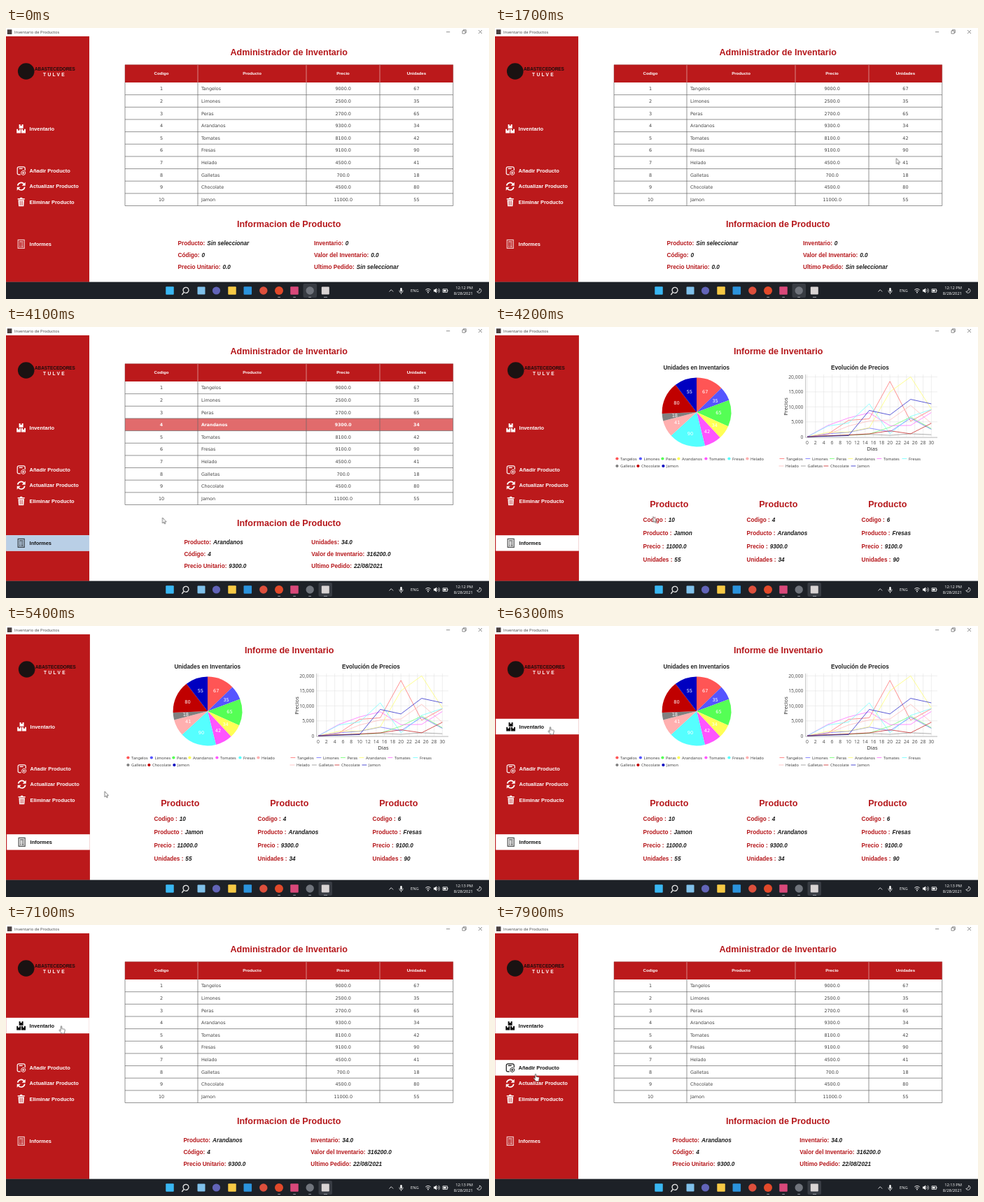
These frames come from a looping animation (690 by 388 pixels, 8 s). An HTML page:

```html
<!DOCTYPE html>
<html lang="es">
<head>
<meta charset="utf-8">
<title>Inventario de Productos</title>
<style>
  html, body { margin: 0; width: 100%; height: 100%; overflow: hidden; background: #fff; }
  svg { display: block; width: 100vw; height: 100vh; }
  text { font-family: "Liberation Sans", Arial, sans-serif; fill: #222; white-space: pre; }
  .mid { text-anchor: middle; }
  .end { text-anchor: end; }
  .title { font-size: 12.55px; font-weight: bold; fill: #b5171b; }
  .field { font-size: 8.2px; font-weight: bold; fill: #b5171b; }
  .field tspan { font-style: italic; fill: #1c1c1c; }
  .chart { font-size: 8.2px; font-weight: bold; }
  .head { font-size: 6.1px; font-weight: bold; fill: #fff; }
  .cell { font: 6.45px "DejaVu Sans", sans-serif; fill: #444; }
  .picked { font: bold 6.2px "DejaVu Sans", sans-serif; fill: #fff; }
  .slice { font: 6.6px "DejaVu Sans", sans-serif; fill: #fff; }
  .legend { font: 5.7px "Noto Sans", sans-serif; fill: #444; }
  .tick { font: 6.8px "Noto Sans", sans-serif; fill: #555; }
  .axis { font: 7.6px "Noto Sans", sans-serif; fill: #333; }
  .sys { font: 5.75px "Open Sans", sans-serif; fill: #fff; }
  .menu text { font-size: 7.45px; font-weight: bold; fill: currentColor; }
</style>
</head>
<body>
<svg id="stage" viewBox="0 0 690 388" preserveAspectRatio="none"></svg>
<script>
const LOOP = 8000;
const RED = '#bb191b';

const text = (x, y, str, cls, extra = '') => `<text x="${x}" y="${y}" class="${cls}" ${extra}>${str}</text>`;
const rect = (x, y, w, h, fill, extra = '') => `<rect x="${x}" y="${y}" width="${w}" height="${h}" fill="${fill}" ${extra}/>`;
const circle = (x, y, r, fill) => `<circle cx="${x}" cy="${y}" r="${r}" fill="${fill}"/>`;
const line = (d, stroke, width = 0.7) => `<path d="${d}" fill="none" stroke="${stroke}" stroke-width="${width}"/>`;
const group = (id, ...parts) => `<g id="${id}">${parts.flat(9).join('')}</g>`;
const field = (x, y, label, value) => text(x, y, `${label}<tspan dx="3">${value}</tspan>`, 'field');

// name, units, price, pie/line colour, price history every five days
const products = [
  ['Tangelos', 67, '9000.0', '#ff5555', [0, 900, 5500, 6000, 18500, 5200, 9000]],
  ['Limones', 35, '2500.0', '#5555ff', [0, 1000, 1500, 2900, 1700, 6200, 2500]],
  ['Peras', 65, '2700.0', '#55ff55', [0, 300, 500, 900, 3200, 6600, 2700]],
  ['Arandanos', 34, '9300.0', '#ffff55', [0, 1500, 1600, 3000, 15000, 20000, 9300]],
  ['Tomates', 42, '8100.0', '#ff55ff', [0, 3800, 6300, 8000, 3700, 3800, 8100]],
  ['Fresas', 90, '9100.0', '#55ffff', [0, 3600, 4600, 11000, 1000, 6800, 9100]],
  ['Helado', 41, '4500.0', '#ffafaf', [0, 800, 3600, 5300, 5600, 10500, 4500]],
  ['Galletas', 18, '700.0', '#808080', [0, 400, 600, 800, 500, 1000, 700]],
  ['Chocolate', 80, '4500.0', '#c00000', [0, 300, 600, 1000, 2000, 1000, 4500]],
  ['Jamon', 55, '11000.0', '#0000c0', [0, 200, 400, 8800, 7300, 12500, 11000]],
];

// ---- sidebar ----
const stroke = (d, w = 1.2) => `<path d="${d}" fill="none" stroke="currentColor" stroke-width="${w}"/>`;
const solid = d => `<path d="${d}" fill="currentColor"/>`;
const crate = (x, y) => solid(`M${x} ${y}h2v2h2v-2h2v5.8h-6z`);
const icons = {
  crates: crate(-6.5, 0.7) + crate(0.3, 0.7) + crate(-3.1, -6),
  add: stroke('M-1 5.5H-3.5A2 2 0 0 1-5.5 3.5V-3.5A2 2 0 0 1-3.5-5.5H3.5A2 2 0 0 1 5.5-3.5V-.5M-3-3H2')
     + stroke('M3 0A3 3 0 1 1 2.99 0M3 1.4V4.6M1.4 3H4.6', 1),
  cycle: stroke('M-5-1A5 5 0 0 1 4-3.2M5 1A5 5 0 0 1-4 3.2', 1.7) + solid('M6-6V-1H1zM-6 6V1H-1z'),
  bin: solid('M-5-5H-2L-1-6.2H1L2-5H5V-3.6H-5z') + solid('M-4.2-2.8H4.2L3.6 6.2H-3.6z')
     + line('M-1.8-1.5V5M0-1.5V5M1.8-1.5V5', RED, 0.7),
  report: `<g opacity=".75">${stroke('M-4.5-6H4.5V6H-4.5z', 1.2)}${stroke('M-2.8-3.6H2.8M-2.8-1.2H-1.2M0-1.2H2.8M-2.8 1.2H-1.2M0 1.2H2.8M-2.8 3.6H-1.2M0 3.6H2.8', 1.3)}</g>`,
};
const entry = (y, icon, label, color) =>
  `<g class="menu" color="${color}"><g transform="translate(21.7 ${y})">${icons[icon]}</g>${text(33.6, y + 2.7, label, '')}</g>`;
const menu = [
  [144, 'crates', 'Inventario'],
  [204.4, 'add', 'Añadir Producto'],
  [226.7, 'cycle', 'Actualizar Producto'],
  [249, 'bin', 'Eliminar Producto'],
  [309.4, 'report', 'Informes'],
];
const lit = (id, item, fill = '#fff') =>
  group(id, rect(0.2, item[0] - 11.2, 118.7, 22.4, fill), entry(...item, '#111'));

const sidebar = group('sidebar',
  rect(-1, 11.9, 120, 351.9, RED),
  circle(28.7, 62, 11.8, '#1a1212'),
  text(41, 60.8, 'ABASTECEDORES', '', 'font-size="6.4" font-weight="bold" style="fill:#1a0c0c"'),
  text(53, 69.2, 'TULVE', '', 'font-size="6.6" font-weight="bold" letter-spacing="2.4" style="fill:#fff"'),
  menu.map(item => entry(...item, '#fff')),
  lit('litStock', menu[0]), lit('litAdd', menu[1]),
  lit('litReport', menu[4]), lit('pressReport', menu[4], '#b9cfe6'));

// ---- inventory page ----
const TOP = 78, ROW = 17.65;
const cols = [170, 274, 429, 534, 638.7];
const row = ([name, units, price], i, cls) => {
  const y = TOP + ROW * (i + 0.5) + 2.4;
  return text(222, y, i + 1, cls + ' mid') + text(279, y, name, cls)
       + text(481.7, y, price, cls + ' mid') + text(586.4, y, units, cls + ' mid');
};
const bottom = TOP + ROW * 10;
const grid = products.map((p, i) => `M170 ${TOP + ROW * (i + 1)}H638.7`).join('')
  + cols.map(x => `M${x} ${TOP}V${bottom}`).join('');
const info = (id, xs, values, stockLabel, worthLabel) => group(id,
  ['Producto:', 'Código:', 'Precio Unitario:', stockLabel, worthLabel, 'Ultimo Pedido:'].map((label, i) =>
    field(xs[i < 3 ? 0 : 1], 311 + (i % 3) * 16.75, label, values[i])));
const berry = ['Arandanos', '4', '9300.0', '34.0', '316200.0', '22/08/2021'];

const stockPage = group('stockPage',
  text(404.2, 39.3, 'Administrador de Inventario', 'title mid'),
  rect(170, 52.7, 468.7, TOP - 52.7, RED),
  line('M274 53V78M429 53V78M534 53V78', '#e6b5b5'),
  ['Codigo', 'Producto', 'Precio', 'Unidades'].map((h, i) =>
    text((cols[i] + cols[i + 1]) / 2, 67.3, h, 'head mid')),
  products.map((p, i) => row(p, i, 'cell')),
  group('pickedRow', rect(170, TOP + ROW * 3, 468.7, ROW, '#e16b6c'), row(products[3], 3, 'picked')),
  line(grid, '#666'),
  line(`M170 52.7H638.7V${TOP}M170 52.7V${TOP}`, '#8a3030', 0.5),
  text(404.2, 285.3, 'Informacion de Producto', 'title mid'),
  info('infoEmpty', [245.5, 440], ['Sin seleccionar', '0', '0.0', '0', '0.0', 'Sin seleccionar'], 'Inventario:', 'Valor del Inventario:'),
  info('infoPicked', [254.4, 436.3], berry, 'Unidades:', 'Valor de Inventario:'),
  info('infoBack', [253.4, 435.3], berry, 'Inventario:', 'Valor del Inventario:'));

// ---- report page ----
const total = products.reduce((sum, p) => sum + p[1], 0);
const polar = (turn, r) => {
  const a = turn * 2 * Math.PI;
  return [288 + r * Math.sin(a), 122 - r * Math.cos(a)].map(v => v.toFixed(2));
};
let turn = 0;
const slices = [], sliceLabels = [];
for (const [, units, , color] of products) {
  const next = turn + units / total;
  const [x, y] = polar((turn + next) / 2, 31.5);
  slices.push(`<path d="M288 122L${polar(turn, 49.4)}A49.4 49.4 0 0 1 ${polar(next, 49.4)}z" fill="${color}"/>`);
  sliceLabels.push(text(x, +y + 2.4, units, 'slice mid'));
  turn = next;
}

const dayX = d => 446 + d * 5.91;
const priceY = p => 157.2 - p * 0.00429;
const days = Array.from({ length: 16 }, (_, i) => i * 2);
const prices = [0, 5000, 10000, 15000, 20000];
const plot = [
  line(days.map(d => `M${dayX(d)} 68V157.5`).join('') + prices.map(p => `M444 ${priceY(p)}H632`).join(''), '#dcdcdc', 0.5),
  line('M443.7 68V158.3H632', '#999', 0.6),
  days.map(d => text(dayX(d), 167.8, d, 'tick mid')),
  prices.map(p => text(440.5, priceY(p) + 2.5, p.toLocaleString('en-US'), 'tick end')),
  products.map(p => line('M' + p[4].map((v, i) => `${dayX(i * 5)} ${priceY(v)}`).join('L'), p[3], 0.65)),
  text(539, 177.4, 'Días', 'axis mid'),
  text(0, 0, 'Precios', 'axis mid', 'transform="translate(417.5 114) rotate(-90)"'),
];
const legend = (xs, firstRow, mark) => products.map(([name, , , color], i) => {
  const y = i < firstRow ? 188.5 : 199;
  return mark(xs[i], y, color) + text(xs[i], y + 2, name, 'legend');
});
const card = (mid, x, n) => {
  const [name, units, price] = products[n - 1];
  return text(mid, 258, 'Producto', 'title mid')
    + [['Codigo :', n], ['Producto :', name], ['Precio :', price], ['Unidades :', units]]
      .map(([label, value], i) => field(x, 278.8 + i * 19.15, label, value)).join('');
};

const reportPage = group('reportPage',
  text(404.7, 39.3, 'Informe de Inventario', 'title mid'),
  text(287.7, 60.7, 'Unidades en Inventarios', 'chart mid'),
  text(521.5, 60.7, 'Evolución de Precios', 'chart mid'),
  slices, sliceLabels, plot,
  legend([179, 212.5, 244, 267, 306, 339, 365, 179, 209, 245], 7, (x, y, c) => circle(x - 4.6, y, 2.1, c)),
  legend([416, 453, 487.5, 514, 555, 591, 415, 446.5, 479, 518], 6, (x, y, c) => line(`M${x - 9.5} ${y}h6.8`, c, 0.7)),
  card(248.8, 211.5, 10), card(404.8, 359.6, 4), card(560.8, 523.6, 6));

// ---- window frame and taskbar ----
const titleBar = [
  rect(1.8, 2.2, 6.6, 6.8, '#4a4040'),
  text(12, 8, 'Inventario de Productos', 'sys', 'style="fill:#444"'),
  line('M629 5.7h5.2M652 4h4v4h-4zM653.3 4V2.7h4v4H656M675 3l5 5M680 3l-5 5', '#444', 0.6),
];
const tile = (x, size, fill) => rect(x - size / 2, 376 - size / 2, size, size, fill, 'rx="1"');
const taskbar = [
  rect(0, 363.6, 690, 24.4, '#1d2127'),
  group('focusRecorder', rect(424.5, 366, 19.5, 20, '#383c43', 'rx="2"')),
  group('focusApp', rect(446.5, 366, 19.5, 20, '#383c43', 'rx="2"')),
  tile(234, 11.5, '#39b7f2'),
  line('M261 375A4 4 0 1 1 260.99 374.9M254.3 378l-3 4', '#e8e8e8', 1.3),
  tile(279, 11, '#7fc0ea'),
  circle(300.5, 376, 5.6, '#6264b8'),
  tile(323, 11.5, '#f6c945'),
  tile(345.3, 11.5, '#2b93dc'),
  circle(367.8, 376, 5.7, '#dd4f3c'),
  circle(390, 376, 6, '#e2492a'),
  tile(412, 11.5, '#d8487a'),
  circle(434.2, 376, 5.7, '#70747c'),
  tile(456.3, 11, '#d9d4d4'),
  line('M388.3 385.4h3.6M410.3 385.4h3.6M432.3 385.4h3.6M454 385.4h5', '#a9adb5', 0.9),
  line('M547.5 377.5l2.8-2.8 2.8 2.8', '#fff', 0.8),
  line('M562 375.5v1a2.5 2.5 0 0 0 5 0v-1M564.5 379v2', '#fff', 0.7),
  rect(563.3, 372, 2.4, 5.4, '#fff', 'rx="1.2"'),
  text(578, 378.2, 'ENG', 'sys'),
  line('M599.3 375a5.4 5.4 0 0 1 7.4 0M600.8 376.8a3.4 3.4 0 0 1 4.4 0', '#fff', 0.9),
  circle(603, 378.6, 0.9, '#fff'),
  '<path d="M611 374.6h1.8l2.4-2v7l-2.4-2H611z" fill="#fff"/>',
  line('M616.6 374.2a2.5 2.5 0 0 1 0 3.7M618 372.8a4.4 4.4 0 0 1 0 6.5', '#fff', 0.7),
  line('M624 373.8h6.4v4.6H624zM631 375.2v1.8', '#fff', 0.8),
  rect(625, 374.8, 3.6, 2.6, '#fff'),
  group('clockA', text(667, 374, '12:12 PM', 'sys end')),
  group('clockB', text(667, 374, '12:13 PM', 'sys end')),
  text(667, 382.2, '8/28/2021', 'sys end'),
  line('M676.5 373a3.2 3.2 0 1 1-3.7 4.3a3.4 3.4 0 0 0 3.7-4.3z', '#fff', 0.7),
];

const pointer = d => `<path d="${d}" fill="#fff" stroke="#222" stroke-width=".55" stroke-linejoin="round"/>`;
const cursor = group('cursor',
  group('arrow', pointer('M0 0V8L1.8 6.3 3 9 4.2 8.5 3.1 5.9H5.5z')),
  group('hand', pointer('M-.8 .7Q0-.5 .8 .7V4L4.6 4.8Q5.5 5 5.3 6.2L4.7 8.6V10.8H-.2V9.6L-3 6.6Q-3.2 5.3-2 5.7L-.8 6.8z')));

document.getElementById('stage').innerHTML =
  [rect(0, 0, 690, 388, '#fff'), titleBar, stockPage, reportPage, sidebar, taskbar, cursor].flat(9).join('');

// ---- timing ----
const play = (id, frames) =>
  document.getElementById(id).animate(frames, { duration: LOOP, iterations: Infinity });
const isOn = (ranges, t) => ranges.some(([from, to]) => t >= from && t < to);
// One hard step at each distinct boundary of the visible ranges.
const show = (id, ranges) => {
  const times = [...new Set([0, ...ranges.flat(), LOOP])].sort((a, b) => a - b);
  play(id, times.map(t => ({ offset: t / LOOP, opacity: +isOn(ranges, t), easing: 'step-end' })));
};

const PICK = 2000, REPORT = 4200, BACK = 7000;
const visible = {
  stockPage: [[0, REPORT], [BACK, LOOP]],
  reportPage: [[REPORT, BACK]],
  infoEmpty: [[0, PICK]],
  infoPicked: [[PICK, REPORT]],
  infoBack: [[BACK, LOOP]],
  pickedRow: [[PICK, REPORT]],
  focusRecorder: [[0, PICK]],
  focusApp: [[PICK, LOOP]],
  clockA: [[0, 4300]],
  clockB: [[4300, LOOP]],
  litStock: [[5820, LOOP]],
  litAdd: [[7700, LOOP]],
  litReport: [[3180, BACK]],
  pressReport: [[3600, REPORT]],
  arrow: [[1100, 3180], [3900, 5820], [7310, 7700]],
  hand: [[3180, 3900], [5820, 7310], [7700, LOOP]],
};
for (const [id, ranges] of Object.entries(visible)) show(id, ranges);

play('sidebar', [[0, 0], [REPORT, 0.9], [BACK, 0], [LOOP, 0]].map(([t, x]) =>
  ({ offset: t / LOOP, transform: `translate(${x}px, 0px)`, easing: 'step-end' })));

const path = [
  [0, 692, 330], [1100, 692, 330], [1900, 534, 139], [2400, 534, 139], [2800, 278, 171],
  [3200, 70, 306], [3800, 70, 306], [4100, 223.5, 273], [4300, 228, 270], [5200, 228, 270],
  [5400, 141, 237], [5700, 125, 165], [5950, 79, 144.5], [7200, 79, 144.5], [7900, 58, 213], [LOOP, 57, 214],
];
play('cursor', path.map(([t, x, y]) => ({ offset: t / LOOP, transform: `translate(${x}px, ${y}px)` })));
</script>
</body>
</html>
```
